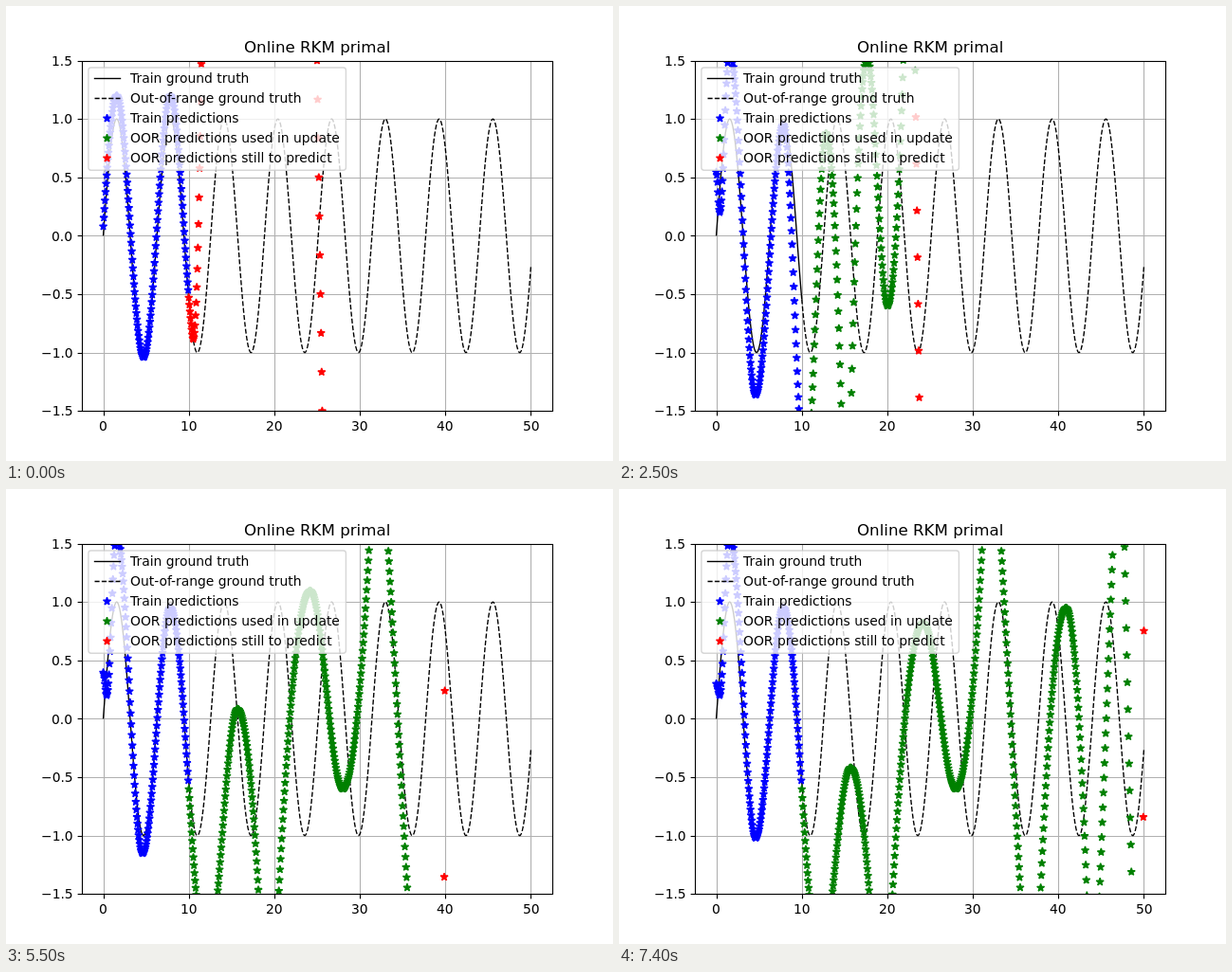
Recreate the animation shown at these times as an HTML page with a canvas. Size 640 px wide and 480 px high, loop 7.5 s.

```html
<!DOCTYPE html>
<html lang="en">
<head>
<meta charset="utf-8">
<title>Online RKM primal</title>
<style>
  html, body { margin: 0; width: 100%; height: 100%; overflow: hidden; background: #fff; }
  canvas { display: block; }
</style>
</head>
<body>
<canvas id="stage" width="640" height="480"></canvas>
<script>
const ctx = document.getElementById('stage').getContext('2d');
const FRAMES = 75, STEP = 100, PER_UNIT = 15;
const PT = 100 / 72, EM = 10 * PT;
const BLUE = '#0000ff', GREEN = '#008000', RED = '#ff0000', BROWN = '#a52a2a';
const px = x => 102.55 + x * 9.018;
const py = y => 242.4 - y * 123.2;
const snap = v => Math.floor(v + 0.5) + 0.5;
const isFar = y => Math.abs(y) > 3;
const learnedEnd = n => 10 + 40 * n / FRAMES;

// Turning points of the fitted curve: x, final y, y offset per step still to go.
const trainTurns = [[0, .3, .005], [.4, .2], [1.55, 1.6], [4.6, -1.02, -.007], [7.85, .95]];
const rangeTurns = [[12.1, -2.1], [15.7, -.42, .0265], [19.35, -3.4], [24.2, .82, .0145],
  [28, -.6], [32.1, 3.05], [36.95, -3.3], [40.9, .95], [44, -3.05], [47.25, 3.15]];

function settle(turns, n) {
  return turns.map(([x, y, drift = 0]) => [x, y + drift * (FRAMES - 1 - n)]);
}

// The steep line where the fit runs away, swaying around the learned end.
function swing(n) {
  const sway = Math.cos(0.29 * (n - 55)), falling = n < 50;
  const mid = learnedEnd(n) + (falling ? -0.28 - 0.6 * sway : 0.28 + 0.31 * sway);
  const top = falling ? 4.2 : -5.5, half = falling ? 0.7 : 0.23;
  return [[mid - half, top], [mid + half, -top]];
}

// Early on the turns are squeezed against the learned end, later they rest.
function turnsAt(n) {
  const end = learnedEnd(n);
  let range = settle(rangeTurns, n);
  if (n < 50) {
    const count = n < 25 ? 3 : 5, gain = n < 25 ? 0.28 : 1;
    range = range.slice(0, count)
      .map(([x, y], i) => [Math.min(x, end - 3.3 - 2.4 * (count - 1 - i)), y * gain])
      .filter(p => p[0] > 9);
  } else {
    range = range.filter(p => p[0] < end - 1.8);
  }
  return [...settle(trainTurns, n), ...range, ...swing(n)];
}

// Smooth between visible turning points, sharper towards far ones.
function curve(turns, x) {
  const i = turns.findIndex(p => p[0] > x);
  if (i < 1) return 9;
  const [x0, y0] = turns[i - 1], [x1, y1] = turns[i];
  const u = (x - x0) / (x1 - x0);
  const e = isFar(y0) && isFar(y1) ? u
    : isFar(y0) ? 1 - (1 - u) ** 2
    : isFar(y1) ? u * u
    : (1 - Math.cos(Math.PI * u)) / 2;
  return y0 + (y1 - y0) * e;
}

// Before enough updates: a near sine that bursts upwards and crosses back once.
function firstFit(x) {
  const burst = 2.1 * Math.max(0, x - 10.4) ** 2;
  return Math.min(0.08 + 1.12 * Math.sin(x) + burst, 5 * (25.3 - x));
}

const starPath = new Path2D();
for (let i = 0; i < 10; i++) {
  const r = 3 * PT * (i % 2 ? 0.381966 : 1), a = i * Math.PI / 5;
  starPath.lineTo(r * Math.sin(a), -r * Math.cos(a));
}
starPath.closePath();

function star(x, y, color) {
  ctx.save();
  ctx.translate(x, y);
  ctx.fillStyle = ctx.strokeStyle = color;
  ctx.lineWidth = PT;
  ctx.lineJoin = 'bevel';
  ctx.fill(starPath);
  ctx.stroke(starPath);
  ctx.restore();
}

function line(points, color, width, dashed) {
  ctx.beginPath();
  points.forEach(p => ctx.lineTo(p[0], p[1]));
  ctx.strokeStyle = color;
  ctx.lineWidth = width;
  ctx.setLineDash(dashed ? [3.7 * PT, 1.6 * PT] : []);
  ctx.stroke();
  ctx.setLineDash([]);
}

// anchor: 0 left, 0.5 centre, 1 right; glyphs start on whole pixels
function text(s, x, y, anchor, size = EM) {
  ctx.font = `${size}px "DejaVu Sans", sans-serif`;
  ctx.fillStyle = '#000';
  ctx.fillText(s, Math.round(x - anchor * ctx.measureText(s).width), Math.round(y));
}

function sine(from, to) {
  const out = [];
  for (let i = 0; i <= (to - from) * PER_UNIT; i++) {
    const x = from + i / PER_UNIT;
    out.push([px(x), py(Math.sin(x))]);
  }
  return out;
}

const xTicks = [0, 10, 20, 30, 40, 50];
const yTicks = [-1.5, -1, -0.5, 0, 0.5, 1, 1.5];
const trainTruth = sine(0, 10), rangeTruth = sine(10, 50);

function drawPredictions(n) {
  const turns = turnsAt(n), end = learnedEnd(n);
  let anyRed = false;
  for (let i = 0; i <= 50 * PER_UNIT; i++) {
    const x = i / PER_UNIT, y = n < 8 ? firstFit(x) : curve(turns, x);
    if (Math.abs(y) > 1.54) continue;
    const color = x < 10 ? BLUE : x < end - 1e-6 ? GREEN : RED;
    if (color === RED) anyRed = true;
    star(px(x), py(y), color);
  }
  return anyRed;
}

function drawAxes() {
  ctx.strokeStyle = '#000';
  ctx.lineWidth = 1.11;
  ctx.strokeRect(80.5, 58.5, 496, 369);
  for (const t of xTicks) {
    const x = snap(px(t));
    line([[x, 427.5], [x, 432.4]], '#000', 1.11);
    text(String(t), px(t), 448, 0.5);
  }
  for (const t of yTicks) {
    const y = snap(py(t));
    line([[75.6, y], [80.5, y]], '#000', 1.11);
    text(t.toFixed(1).replace('-', '\u2212'), 70.3, py(t) + 5.2, 1);
  }
  text('Online RKM primal', 328, 49, 0.5, 12 * PT);
}

function drawLegend(lastColor) {
  ctx.beginPath();
  ctx.roundRect(86.9, 65, 271.5, 108.3, 2.8);
  ctx.fillStyle = 'rgba(255,255,255,.8)';
  ctx.fill();
  ctx.strokeStyle = 'rgba(204,204,204,.8)';
  ctx.lineWidth = PT;
  ctx.stroke();
  line([[92.8, 76.5], [121.2, 76.5]], '#000', PT);
  line([[93.5, 97.5], [120.5, 97.5]], '#000', PT, true);
  [BLUE, GREEN, lastColor].forEach((c, i) => star(106.5, 118.5 + 21 * i, c));
  ['Train ground truth', 'Out-of-range ground truth', 'Train predictions',
    'OOR predictions used in update', 'OOR predictions still to predict']
    .forEach((s, i) => text(s, 131, 81 + 21 * i, 0));
}

function draw(n) {
  ctx.fillStyle = '#fff';
  ctx.fillRect(0, 0, 640, 480);
  ctx.save();
  ctx.beginPath();
  ctx.rect(80, 58, 496, 369.5);
  ctx.clip();
  for (const t of xTicks) line([[snap(px(t)), 58], [snap(px(t)), 428]], '#b0b0b0', 1.11);
  for (const t of yTicks) line([[80, snap(py(t))], [576, snap(py(t))]], '#b0b0b0', 1.11);
  line(trainTruth, '#000', PT);
  line(rangeTruth, '#000', PT, true);
  const anyRed = drawPredictions(n);
  ctx.restore();
  drawAxes();
  drawLegend(anyRed ? RED : BROWN);
}

const start = performance.now();
let shown = -1;
function tick() {
  const n = Math.floor((performance.now() - start) / STEP) % FRAMES;
  if (n !== shown) draw(shown = n);
  requestAnimationFrame(tick);
}
tick();
</script>
</body>
</html>
```
